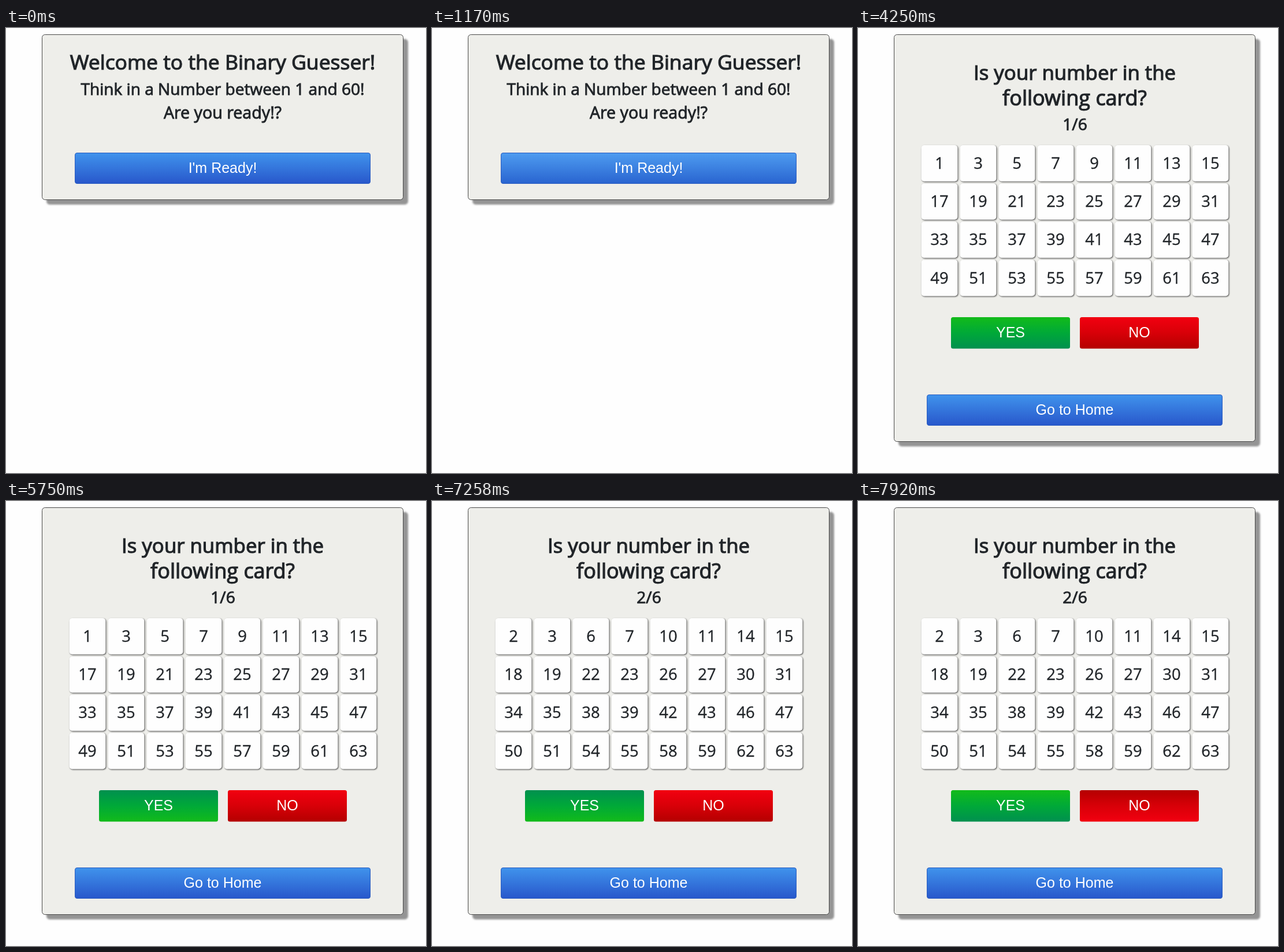
Write an HTML page that moves like this. It is 727x771 px and loops after 8 s.

```html
<!DOCTYPE html>
<html lang="en">
<head>
<meta charset="utf-8">
<title>Binary Guesser</title>
<style>
html, body { margin: 0; width: 100%; height: 100%; overflow: hidden; background: #fefefe; }
svg { display: block; width: 727px; height: 771px; }
text { text-anchor: middle; fill: #212529; font-family: "Open Sans", "Noto Sans", sans-serif; }
.panel { fill: #eeeeea; stroke: #484848; filter: drop-shadow(8px 8px 1.8px #949494); }
.title { stroke: #212529; stroke-width: 1.2px; }
.sub { stroke: #212529; stroke-width: .9px; }
.tile { fill: #fefefe; filter: drop-shadow(1.5px 1.5px 1px #444); }
.num { stroke: #212529; stroke-width: .35px; }
.label { font-family: "Liberation Sans", Arial, sans-serif; fill: #fff; }
</style>
</head>
<body>
<svg viewBox="0 0 727 771">
  <defs id="defs"></defs>
  <g id="scene"></g>
</svg>
<script>
const LOOP = 8000, MID = 375;
const fills = {
  blue: ['#4093ec', '#2857cb'],
  hover: ['#4e9cf0', '#2964d0'],
  green: ['#12bb1a', '#00a938', '#00904f'],
  red: ['#f20010', '#d80008', '#b40000']
};

function gradient(id, colours) {
  const stops = colours.map((c, i) =>
    `<stop offset="${i / (colours.length - 1)}" stop-color="${c}"/>`);
  return `<linearGradient id="${id}" x2="0" y2="1">${stops.join('')}</linearGradient>`;
}

document.getElementById('defs').innerHTML = Object.entries(fills).map(([id, c]) =>
  gradient(id, c) + gradient(id + 'Flip', [...c].reverse())).join('');

const text = (cls, size, x, y, s) =>
  `<text class="${cls}" font-size="${size}" x="${x}" y="${y}">${s}</text>`;

const rect = (x, y, w, h, r, attrs) =>
  `<rect x="${x}" y="${y}" width="${w}" height="${h}" rx="${r}" ${attrs}/>`;

const panel = h => rect(62.5, 11.5, 625, h, 5, 'class="panel"');

const wideButton = (y, label, fill) =>
  rect(119.5, y, 511, 53, 3.5, `fill="url(#${fill})" stroke="#2a5cc0"`) +
  text('label', 25, MID, y + 34.5, label);

const answerButton = (x, label, fill) =>
  rect(x, 501, 206, 54.5, 3.5, `fill="url(#${fill})"`) +
  text('label', 25, x + 103, 536, label);

function welcome(hover) {
  return panel(286) +
    text('title', 35.5, MID, 72.4, 'Welcome to the Binary Guesser!') +
    text('sub', 28.1, MID, 115.7, 'Think in a Number between 1 and 60!') +
    text('sub', 28.6, MID, 157.1, 'Are you ready!?') +
    wideButton(216.5, "I'm Ready!", hover ? 'hover' : 'blue');
}

// Card n holds every number up to 63 whose n-th binary digit is 1.
function tiles(n) {
  let out = '', i = 0;
  for (let k = 1; k < 64; k++) {
    if (!(k >> (n - 1) & 1)) continue;
    const x = 109.6 + i % 8 * 67, y = 203 + Math.floor(i / 8) * 66.2;
    out += rect(x, y, 62.8, 62.8, 5, 'class="tile"') + text('num', 27.4, x + 31.4, y + 41, k);
    i++;
  }
  return out;
}

function card(n, yesHover, noHover) {
  return panel(705) +
    text('title', 34.8, MID, 90.4, 'Is your number in the') +
    text('title', 36, MID, 133.6, 'following card?') +
    text('sub', 28.1, MID + .5, 176.9, n + '/6') +
    tiles(n) +
    answerButton(161, 'YES', yesHover ? 'greenFlip' : 'green') +
    answerButton(384, 'NO', noHover ? 'redFlip' : 'red') +
    wideButton(635.5, 'Go to Home', 'blue');
}

function picture(t) {
  if (t < 2000) return welcome(t >= 1170);
  return card(t < 6460 ? 1 : 2, t >= 5750 && t < 7790, t >= 7920);
}

const scene = document.getElementById('scene');
let shown = '';

function draw() {
  const next = picture(performance.now() % LOOP);
  if (next !== shown) scene.innerHTML = shown = next;
  requestAnimationFrame(draw);
}
draw();
</script>
</body>
</html>
```
